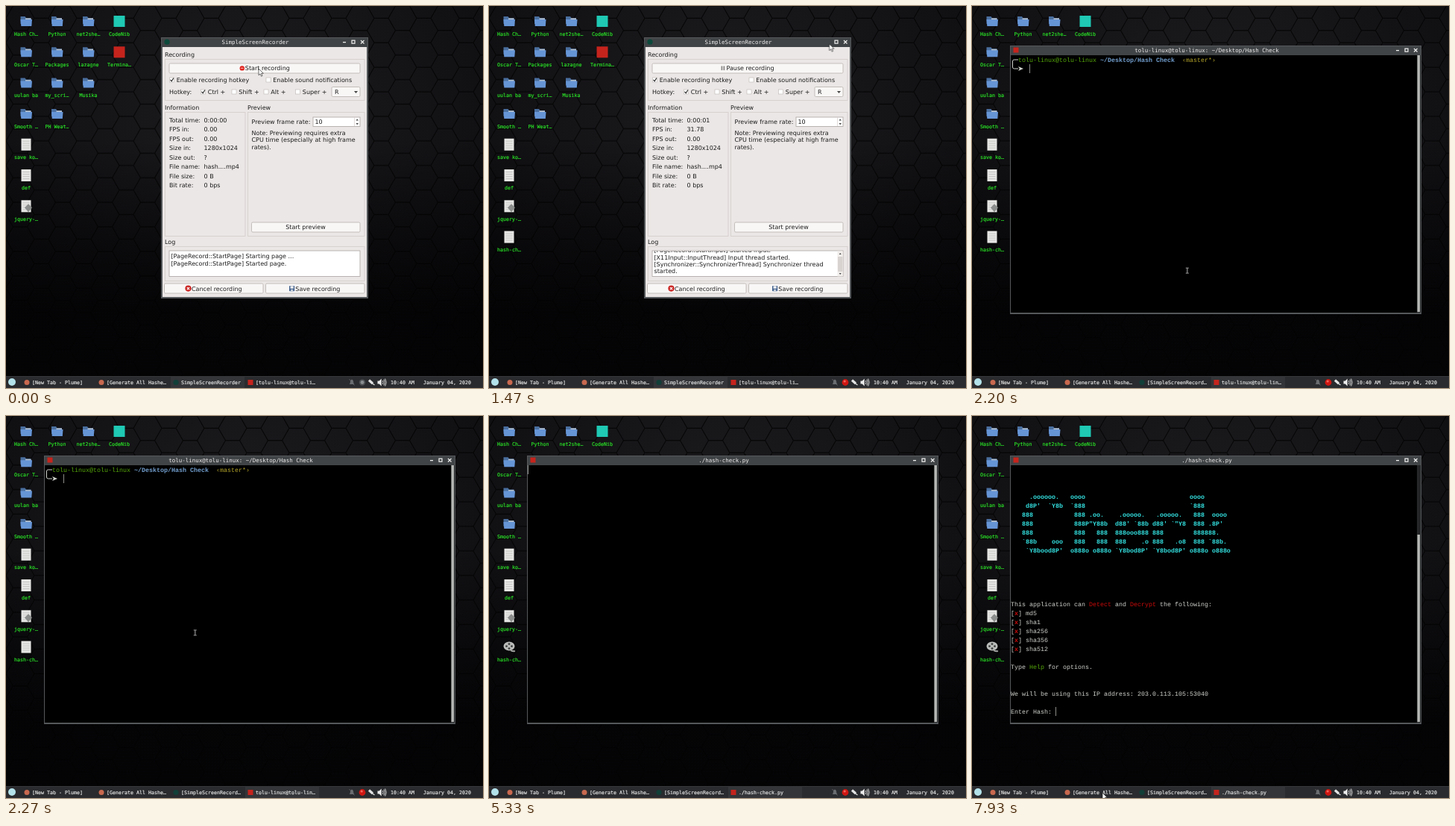
These frames come from a looping animation (640 by 512 pixels, 8000 ms). An HTML page:

```html
<!DOCTYPE html>
<html lang="en">
<head>
<meta charset="utf-8">
<title>Hash check demo</title>
<style>
html, body { margin: 0; width: 100%; height: 100%; overflow: hidden; background: #060607; }
svg { display: block; width: 640px; height: 512px; }
text { white-space: pre; text-rendering: geometricPrecision; }
.desk { font: 6.65px "DejaVu Sans Mono", monospace; fill: #2bea28; stroke: #2bea28; stroke-width: .15px; }
.bar { font: 6.65px "DejaVu Sans Mono", monospace; fill: #e8e8e8; stroke: #e8e8e8; stroke-width: .15px; }
.title { font: 7.48px "DejaVu Sans Mono", monospace; fill: #ececec; }
.ui { font: 8px "DejaVu Sans", sans-serif; fill: #1c1c1c; }
.term { font: 8.333px "Liberation Mono", monospace; fill: #cfd2cc; }
.bold { font-weight: bold; }
.mid { text-anchor: middle; }
</style>
</head>
<body>
<script>
const LOOP = 8000;
const USER = 'tolu-linux@tolu-linux';
const RED = '#cc0a0a', GREEN = '#55a80a', CYAN = '#34e2e2', GREY = '#5c5f5c';
let rules = '', count = 0;

const pct = t => t / LOOP * 100 + '%';

function animate(frames, ease, body) {
  const name = 'a' + count++;
  rules += `@keyframes ${name}{${frames.join('')}}`;
  return `<g style="animation:${name} ${LOOP}ms ${ease} infinite">${body}</g>`;
}

// Times alternate between on and off.
function during(body, ...times) {
  const frames = times[0] ? ['0%{opacity:0}'] : [];
  times.forEach((t, i) => frames.push(`${pct(t)}{opacity:${i % 2 ? 0 : 1}}`));
  return animate(frames, 'step-end', body);
}

function move(points, ease, body) {
  return animate(points.map(([t, x, y]) => `${pct(t)}{transform:translate(${x}px,${y}px)}`), ease, body);
}

const text = (x, y, s, cls, fill) =>
  `<text x="${x}" y="${y}" class="${cls}"${fill ? ` style="fill:${fill}"` : ''}>${s}</text>`;
const rect = (x, y, w, h, fill, more = '') =>
  `<rect x="${x}" y="${y}" width="${w}" height="${h}" fill="${fill}" ${more}/>`;
const dot = (x, y, r, fill) => `<circle cx="${x}" cy="${y}" r="${r}" fill="${fill}"/>`;
const line = (d, stroke, w = 1) => `<path d="${d}" fill="none" stroke="${stroke}" stroke-width="${w}"/>`;
const shape = (d, fill) => `<path d="${d}" fill="${fill}"/>`;
const ui = (x, y, s) => text(x, y, s, 'ui');

/* Desktop */

function wallpaper() {
  const R = 19, h = R * Math.sqrt(3), m = h / 2;
  const d = `M0 ${m}L${R / 2} 0H${R * 1.5}L${R * 2} ${m}H${R * 3}M${R * 2} ${m}L${R * 1.5} ${h}H${R / 2}L0 ${m}`;
  return `<defs>
    <radialGradient id="glow" gradientUnits="userSpaceOnUse" cx="320" cy="140" r="400">
      <stop offset="0" stop-color="#1c1b1e"/><stop offset="1" stop-color="#0e0d10"/>
    </radialGradient>
    <linearGradient id="fade" x1="0" y1="0" x2="0" y2="1">
      <stop offset=".35" stop-color="#020203" stop-opacity="0"/>
      <stop offset=".8" stop-color="#020203" stop-opacity=".85"/>
    </linearGradient>
    <pattern id="hex" width="${R * 3}" height="${h}" patternUnits="userSpaceOnUse">
      <g transform="translate(0 .9)" opacity=".04">${line(d, '#fff', .7)}</g>
      <g opacity=".75">${line(d, '#000', 1.3)}</g>
    </pattern>
  </defs>` + ['glow', 'hex', 'fade'].map(id => rect(0, 0, 640, 512, `url(#${id})`)).join('') +
    dot(320, 256, 60, '#171610');
}

const folder = (x, y) =>
  shape(`M${x - 7.5} ${y - 6.5}h6l1.5 2h6.500v8h-14z`, '#4a6f9f') +
  rect(x - 1, y - 4, 7.5, 3, '#b9c2cc') +
  shape(`M${x - 7.5} ${y - 2.5}h15.500l-.700 9h-14z`, '#6695d6');

const file = (x, y) => rect(x - 6.5, y - 8, 13, 16, '#e6e6e4') +
  line([-4.5, -1.5, 1.5, 4.5].map(k => `M${x - 4.5} ${y + k}h9`).join(''), '#bdbdbb', .7);

const script = (x, y) => file(x, y) + shape(`M${x + 3} ${y - 3}l5 5l-5 6l-5-6z`, '#8b8e8c');

const reel = (x, y) => `<ellipse cx="${x}" cy="${y - 1}" rx="7.500" ry="6" fill="#b9bbb9"/>` +
  [[-3.5, -1], [3.5, -1], [0, -4], [0, 2]].map(([a, b]) => dot(x + a, y + b, 1.4, '#3a3c3b')).join('') +
  line(`M${x + 2} ${y + 4.500}q3 1.500 6 1`, '#a2a4a2', 1.8);

const square = color => (x, y) => rect(x - 7.5, y - 7.5, 15, 15, color);

function icon(col, row, label, draw) {
  const x = [27, 68.5, 110.5, 152][col], y = 20.5 + 41.3 * row;
  return draw(x, y) + text(x, y + 19.3, label, 'desk mid');
}

function desktop() {
  const folders = [
    ['Hash Ch…', 'Oscar T…', 'uulan ba', 'Smooth …'],
    ['Python', 'Packages', 'my_scri…', 'PH Weat…'],
    ['net2she…', 'lazagne', 'Musika']
  ];
  return folders.map((list, c) => list.map((s, r) => icon(c, r, s, folder)).join('')).join('') +
    icon(3, 0, 'CodeNib', square('#1fc9b4')) +
    icon(3, 1, 'Termina…', square('#c5241d')) +
    icon(0, 4, 'save ko…', file) + icon(0, 5, 'def', file) + icon(0, 6, 'jquery-…', script) +
    during(icon(0, 7, 'hash-ch…', file), 465, 2995) +
    during(icon(0, 7, 'hash-ch…', reel), 2995);
}

/* Taskbar */

function taskbar() {
  const label = (n, s) => text(35 + 100 * n, 506.8, s, 'bar');
  const active = n => rect(21 + 100 * n, 497, 99, 15, '#333538');
  return rect(0, 496, 640, 16, '#2a2b2e') + rect(0, 496, 640, .7, '#3c3e41') +
    during(active(2) + label(2, 'SimpleScreenRecorder'), 0, 1525) +
    during(label(2, '[SimpleScreenRecord…'), 1525) +
    during(label(3, '[' + USER.slice(0, 18) + '…'), 0, 2065) +
    during(active(3), 2065) +
    during(label(3, USER.slice(0, 19) + '…'), 2065, 5065) +
    during(label(3, './hash-check.py'), 5065) +
    dot(8, 504, 5, '#b4e2ea') +
    dot(28, 504.5, 3.5, '#c9694f') + label(0, '[New Tab - Plume]') +
    dot(128, 504.5, 3.5, '#c9694f') + label(1, '[Generate All Hashe…') +
    dot(228, 504.5, 3.6, '#123f38') +
    rect(324.5, 501, 7, 7, '#c5241d') +
    shape('M460.500 507q1.500-1 1.500-4q.500-2.500 2-2.500t2 2.500q0 3 1.500 4z', '#6a6d70') +
    line('M460.500 500l7 8.500', '#6a6d70', .8) +
    during(dot(478, 504.5, 4.2, '#4c4f52') + dot(478, 504.5, 2.4, '#8b8e90'), 0, 135) +
    during(dot(478, 504.5, 4.4, '#d01712') + dot(477.2, 503, 1.6, '#f0655c'), 135) +
    line('M487 501.500l5 4.500', '#e4e4e4', 3.2) + line('M491 505.500l3.500 2.500', '#e4e4e4', 1.2) +
    shape('M498.500 502.500h2.200l3-3v10l-3-3h-2.200z', '#ececec') +
    line('M505.300 502q1.500 2.500 0 5M507 500.500q2.500 4 0 8M508.700 499.500q3 5 0 10', '#ececec', .9) +
    text(516, 506.8, '10:40 AM', 'bar') + text(560, 506.8, 'January 04, 2020', 'bar');
}

/* Windows */

function frame(x, y, w, h) {
  return rect(x, y, w, h, '#55585a') + rect(x + 1, y + 1, w - 2, 12, '#414446') +
    line(`M${x + w - 22} ${y + 4.2}h4v4h-4z`, '#eee', 1.2) +
    line(`M${x + w - 10} ${y + 4}l4.500 4.500m0-4.500l-4.500 4.500`, '#eee', 1.2);
}
const minimize = (x, y) => line(`M${x} ${y}h4`, '#eee', 1.3);

const button = (x, y, w, h = 13) => rect(x, y, w, h, '#f9f7f6', 'stroke="#b7b1ae" stroke-width=".8" rx="1.500"');
const field = (x, y, w, h) => rect(x, y, w, h, '#fff', 'stroke="#aaa4a1" stroke-width=".8"');
const panel = (x, y, w, h) => rect(x, y, w, h, 'none', 'stroke="#d3cdca" stroke-width=".8"');

const check = (x, y, s, on) => rect(x, y - 6, 6, 6, '#fff', 'stroke="#bdb7b4" stroke-width=".6"') +
  (on ? line(`M${x + 1} ${y - 3.2}l1.700 2l2.700-4.300`, '#222', 1.1) : '') + ui(x + 9.3, y, s);

function recorder() {
  const info = [['Total time:'], ['FPS in:'], ['FPS out:', '0.00'], ['Size in:', '1280x1024'],
    ['Size out:', '?'], ['File name:', 'hash....mp4'], ['File size:', '0 B'], ['Bit rate:', '0 bps']];
  const value = (row, s) => ui(265.5, 155.8 + 12.5 * row, s);

  const logStart = ui(221.5, 338, '[PageRecord::StartPage] Starting page ...') +
    ui(221.5, 347.5, '[PageRecord::StartPage] Started page.');
  const logEnd = '<g clip-path="url(#log)">' + [
    '[PageRecord::StartInput] Started input.',
    '[X11Input::InputThread] Input thread started.',
    '[Synchronizer::SynchronizerThread] Synchronizer thread',
    'started.'
  ].map((s, i) => ui(221.5, 330.3 + 9.3 * i, s)).join('') + '</g>' +
    rect(467.5, 328.5, 7.2, 34, '#f1eeec') + rect(468, 336, 6.4, 20, '#d8d3d0') +
    shape('M469.700 333l1.500-2l1.500 2zM469.700 358l1.500 2l1.500-2z', '#444');

  return '<clipPath id="log"><rect x="220" y="328.500" width="247" height="33.500"/></clipPath>' +
    frame(208, 42, 278, 350) + during(minimize(452, 48.6), 0, 1330) +
    dot(216, 48.2, 3.6, '#0d4a3c') +
    text(334.5, 50.9, 'SimpleScreenRecorder', 'title mid') +
    rect(210, 55, 274, 335, '#ebe7e6') +
    ui(213, 67.5, 'Recording') + panel(213.5, 71.5, 267.5, 55) + button(219, 77, 256) +
    during(dot(316.8, 83.4, 3.2, '#e0251f') + line('M315 83.400h3.600', '#f6a39c', 1.2) +
      ui(320.8, 86.3, 'Start recording'), 0, 135) +
    during(rect(311.5, 80.5, 1.8, 5.6, '#8c8987') + rect(314.5, 80.5, 1.8, 5.6, '#8c8987') +
      ui(318.5, 86.3, 'Pause recording'), 135) +
    check(219.5, 102, 'Enable recording hotkey', 1) + check(349, 102, 'Enable sound notifications') +
    ui(219, 118, 'Hotkey:') + check(261.5, 118, 'Ctrl +', 1) + check(303, 118, 'Shift +') +
    check(346, 118, 'Alt +') + check(388.5, 118, 'Super +') +
    button(437, 108.5, 38) + ui(441, 118, 'R') + shape('M467 114h5l-2.500 3z', '#444') +
    ui(213, 139, 'Information') + panel(213.5, 142.5, 107.5, 166) +
    info.map(([s, v], i) => ui(219, 155.8 + 12.5 * i, s) + (v ? value(i, v) : '')).join('') +
    during(value(0, '0:00:00') + value(1, '0.00'), 0, 1065) +
    during(value(0, '0:00:01') + value(1, '31.78'), 1065) +
    ui(324, 139, 'Preview') + panel(324.5, 142.5, 156.5, 166) +
    ui(329.5, 158, 'Preview frame rate:') + field(412, 149, 63, 12.5) + ui(414.5, 158, '10') +
    line('M467.500 149.500v11.500', '#d3cdca', .7) +
    shape('M469.500 153.500l1.700-2.200l1.700 2.200zM469.500 157l1.700 2.200l1.700-2.200z', '#444') +
    ['Note: Previewing requires extra', 'CPU time (especially at high frame', 'rates).']
      .map((s, i) => ui(329.5, 172.8 + 9.4 * i, s)).join('') +
    button(329.5, 290, 145.5) + text(402, 299.2, 'Start preview', 'ui mid') +
    ui(213, 318.8, 'Log') + panel(213.5, 322.5, 267.5, 46) + field(219, 328, 256, 34.5) +
    during(logStart, 0, 135) + during(logEnd, 135) +
    button(212.5, 372, 132.5) + dot(244.5, 378.6, 4.1, '#c9211e') +
    line('M242.800 376.900l3.400 3.400m0-3.400l-3.400 3.400', '#fff', 1.2) + ui(249, 381.6, 'Cancel recording') +
    button(348.5, 372, 132.5) + rect(380, 375, 7.2, 7.2, '#45648f', 'rx=".8"') +
    rect(381.5, 375.3, 4.2, 3.4, '#f2f2f2') + rect(382, 379.8, 3.2, 2.4, '#c3ccd8') +
    ui(388.3, 381.6, 'Save recording');
}

const cell = (row, col, s, fill, cls = '') => text(52 + 5 * col, 75 + 12 * row, s, 'term ' + cls, fill);
const caret = (row, col) => rect(52 + 5 * col, 66 + 12 * row, 1, 12, '#8c8e8a');

const HASH = `
 ooooo   ooooo                    oooo
 \`888'   \`888'                    \`888
  888     888   .oooo.    .oooo.o  888 .oo.
  888ooooo888  \`P  )88b  d88(  "8  888P"Y88b
  888     888   .oP"888  \`"Y88b.   888   888
  888     888  d8(  888  o.  )88b  888   888
 o888o   o888o \`Y888""8o 8""888P' o888o o888o`;

const CHECK = `
  .oooooo.   oooo                            oooo
 d8P'  \`Y8b  \`888                            \`888
888           888 .oo.    .ooooo.   .ooooo.   888  oooo
888           888P"Y88b  d88' \`88b d88' \`"Y8  888 .8P'
888           888   888  888ooo888 888        888888.
\`88b    ooo   888   888  888    .o 888   .o8  888 \`88b.
 \`Y8bood8P'  o888o o888o \`Y8bod8P' \`Y8bod8P' o888o o888o`;

const banner = (art, row, col) =>
  art.split('\n').slice(1).map((s, i) => cell(row + i, col, s, CYAN, 'bold')).join('');

function output() {
  const kinds = ['md5', 'sha1', 'sha256', 'sha356', 'sha512'];
  return banner(HASH, 3, 8) + banner(CHECK, 13, 3) +
    cell(25, 0, 'This application can        and         the following:') +
    cell(25, 21, 'Detect', RED) + cell(25, 32, 'Decrypt', RED) +
    kinds.map((s, i) => cell(26 + i, 0, '[ ] ' + s) + cell(26 + i, 1, 'x', RED, 'bold')).join('') +
    cell(32, 0, 'Type      for options.') + cell(32, 5, 'Help', GREEN) +
    during(caret(35, 0), 5665, 6865) +
    during(cell(35, 0, 'We will be using this IP address: 203.0.113.105:53040') +
      cell(37, 0, 'Enter Hash:'), 6995) +
    during(caret(37, 12), 6995, 7395, 7900);
}

function prompt() {
  const cmd = './hash-check.py';
  const typed = n => cell(1, 5, cmd.slice(0, n)) + cell(1, 5 + n, cmd.slice(n), GREY);
  return line('M62 72h-5.500q-2 0-2 2v8q0 2 2 2h5.500', '#cfd2cc', 1) +
    shape('M62 81l7 3l-7 3l1.800-3z', '#cfd2cc') +
    cell(0, 2, USER, GREEN) + cell(0, 24, '~/Desktop/Hash Check', '#729fcf', 'bold') +
    cell(0, 46, '‹master*›', '#b5a52a') +
    during(caret(1, 5), 2065, 2795) +
    during(typed(1) + caret(1, 6), 3395, 3595) +
    during(typed(2), 3595, 4595) + during(caret(1, 7), 3595, 4195) +
    during(cell(1, 5, cmd, GREEN), 4595) +
    during(caret(1, 20), 4595, 5065) + during(caret(2, 0), 5065);
}

function terminal() {
  const title = s => text(315, 61.7, s, 'title mid');
  const thumb = y => rect(597.5, y, 3.5, 410 - y, '#b4b6b4');
  return '<clipPath id="screen"><rect x="52" y="66" width="545" height="344"/></clipPath>' +
    frame(51, 53, 552, 360) + minimize(569, 59.6) + rect(55.5, 55.5, 7, 7, '#c5241d') +
    during(title(USER + ': ~/Desktop/Hash Check'), 0, 5065) +
    during(title('./hash-check.py'), 5065) +
    rect(52, 66, 545, 345, '#000') + rect(597, 66, 5, 345, '#242627') +
    during(thumb(66), 0, 5665) + during(thumb(144), 5665, 6995) + during(thumb(159), 6995) +
    during(prompt(), 0, 5325) + during(caret(0, 0), 5325, 5665) +
    '<g clip-path="url(#screen)">' +
    move([[0, 0, -96], [6995, 0, -120]], 'step-end', during(output(), 5665)) + '</g>';
}

/* Pointer */

function pointer() {
  const path = [
    [0, 339, 84], [130, 339, 84], [400, 385, 74], [600, 440, 54], [735, 470, 38], [870, 467, 43],
    [1070, 459, 48], [1250, 457, 49], [1470, 457, 49], [1530, 433, 158], [1650, 402, 330],
    [1800, 379, 470], [1900, 370, 503], [2040, 370, 503], [2270, 254, 291], [2400, 218, 216],
    [2530, 204, 185], [5665, 204, 185], [6000, 206, 228], [6300, 205, 310], [6530, 204, 341],
    [6870, 214, 372], [7100, 242, 425], [7335, 286, 498], [7600, 256, 503], [7930, 175, 505],
    [8000, 172, 505]
  ];
  const arrow = '<path d="M0 0v8.800l2-1.900l1.500 3.300l1.500-.700l-1.500-3.200h2.800z" fill="#fff" stroke="#111" stroke-width=".6"/>';
  const beam = line('M-1.800-3.500h1.300l.500.500l.500-.500h1.300M0-3v6M-1.800 3.500h1.300l.500-.500l.500.500h1.300', '#d8d8d8', .9);
  return move(path, 'linear',
    during(arrow, 0, 2140, 7050) + during(beam, 2140, 3395, 5665, 7050));
}

const scene = wallpaper() + desktop() + taskbar() +
  during(recorder(), 0, 1525) + during(terminal(), 2065) + pointer();

document.head.insertAdjacentHTML('beforeend', `<style>${rules}</style>`);
document.body.innerHTML = `<svg width="640" height="512" viewBox="0 0 640 512">${scene}</svg>`;
</script>
</body>
</html>
```
